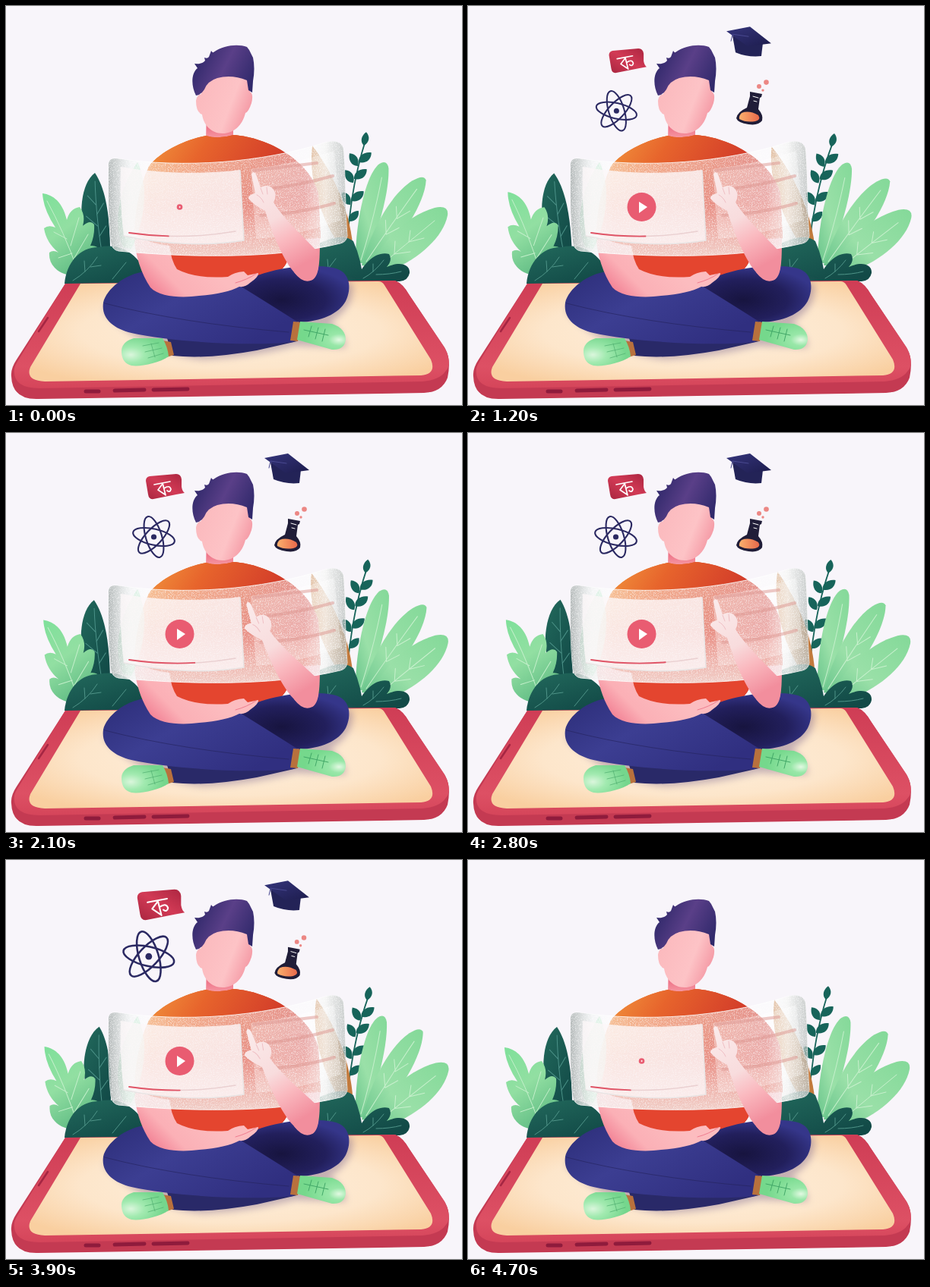
An HTML page that plays this animation: 600x526 px, repeating every 4800 ms.

```html
<!DOCTYPE html>
<html lang="en">
<head>
<meta charset="utf-8">
<title>Learning on a phone</title>
<style>
html, body { margin: 0; width: 100%; height: 100%; overflow: hidden; background: #f8f5fa; }
svg { display: block; width: 100vw; height: 100vh; }
</style>
</head>
<body>
<svg viewBox="0 0 600 526" fill="none" stroke-linecap="round" stroke-linejoin="round">
<defs>
  <linearGradient id="mint" x1="0" y1="0" x2=".5" y2="1"><stop stop-color="#7fe09a"/><stop offset=".5" stop-color="#92dfa2"/><stop offset="1" stop-color="#62bd85"/></linearGradient>
  <linearGradient id="pale" x1="1" y1="0" x2="0" y2="1"><stop stop-color="#84d999"/><stop offset=".6" stop-color="#9ae0a8"/><stop offset="1" stop-color="#68c48b"/></linearGradient>
  <linearGradient id="teal" x1="0" y1="0" x2=".7" y2="1"><stop stop-color="#22695c"/><stop offset="1" stop-color="#124a47"/></linearGradient>
  <linearGradient id="rim" x1="0" y1="0" x2="0" y2="1"><stop stop-color="#cf3d55"/><stop offset=".8" stop-color="#dd5064"/><stop offset="1" stop-color="#d5455a"/></linearGradient>
  <radialGradient id="cream" cx=".5" cy=".5" r=".62"><stop stop-color="#feefdc"/><stop offset=".6" stop-color="#fde6cb"/><stop offset="1" stop-color="#f9cfa0"/></radialGradient>
  <linearGradient id="tee" x1=".05" y1="0" x2=".9" y2=".4"><stop stop-color="#f29a3f"/><stop offset=".35" stop-color="#e7642c"/><stop offset=".75" stop-color="#d43f2a"/><stop offset="1" stop-color="#c9302c"/></linearGradient>
  <linearGradient id="hem" x1="0" y1="0" x2="0" y2="1"><stop offset=".15" stop-color="#e0402f" stop-opacity="0"/><stop offset=".8" stop-color="#e4452f"/></linearGradient>
  <linearGradient id="face" x1="0" y1=".3" x2="1" y2=".7"><stop stop-color="#fbb9bd"/><stop offset=".6" stop-color="#fdc3c6"/><stop offset="1" stop-color="#f3929f"/></linearGradient>
  <linearGradient id="neck" x1="0" y1="0" x2="0" y2="1"><stop offset=".5" stop-color="#ee7388"/><stop offset="1" stop-color="#f9a5ac"/></linearGradient>
  <linearGradient id="hair" x1="0" y1=".3" x2="1" y2=".7"><stop stop-color="#2d2768"/><stop offset=".5" stop-color="#5a3f88"/><stop offset="1" stop-color="#30296b"/></linearGradient>
  <linearGradient id="arm" x1="0" y1=".8" x2=".6" y2=".5"><stop stop-color="#ef7189"/><stop offset=".45" stop-color="#fbb0b6"/><stop offset="1" stop-color="#fcbcbf"/></linearGradient>
  <linearGradient id="forearm" x1="0" y1="0" x2=".35" y2="1"><stop stop-color="#fbecec"/><stop offset=".5" stop-color="#f8dcdd"/><stop offset=".72" stop-color="#fab9bf"/><stop offset="1" stop-color="#f28e9d"/></linearGradient>
  <linearGradient id="thigh" x1="0" y1="0" x2="1" y2=".6"><stop stop-color="#2c2d78"/><stop offset=".45" stop-color="#3c3e92"/><stop offset="1" stop-color="#302f80"/></linearGradient>
  <radialGradient id="far" cx=".45" cy=".6" r=".6"><stop stop-color="#17143f"/><stop offset=".6" stop-color="#221f5c"/><stop offset="1" stop-color="#35368a"/></radialGradient>
  <radialGradient id="shoe1" cx=".2" cy=".6" r=".7"><stop stop-color="#daf6dc"/><stop offset=".4" stop-color="#a2eab0"/><stop offset="1" stop-color="#75d68d"/></radialGradient>
  <radialGradient id="shoe2" cx=".86" cy=".65" r=".7"><stop stop-color="#e2f9e2"/><stop offset=".3" stop-color="#98e7a8"/><stop offset="1" stop-color="#75d88c"/></radialGradient>
  <linearGradient id="edge"><stop stop-color="#87918f" stop-opacity=".6"/><stop offset=".09" stop-color="#e8eeec" stop-opacity=".4"/><stop offset=".18" stop-color="#fff" stop-opacity="0"/><stop offset=".82" stop-color="#fff" stop-opacity="0"/><stop offset=".91" stop-color="#f2f3f1" stop-opacity=".6"/><stop offset="1" stop-color="#949d9a" stop-opacity=".5"/></linearGradient>
  <linearGradient id="haze" x1="0" y1="0" x2="0" y2="1"><stop stop-color="#fff" stop-opacity=".48"/><stop offset=".55" stop-color="#fff" stop-opacity=".42"/><stop offset="1" stop-color="#f4f5f3" stop-opacity=".78"/></linearGradient>
  <linearGradient id="red" x1="1" y1="0" x2="0" y2="1"><stop stop-color="#a9243f"/><stop offset=".5" stop-color="#d23a55"/><stop offset="1" stop-color="#a8253f"/></linearGradient>
  <linearGradient id="navy" x1="0" y1="0" x2="1" y2="1"><stop stop-color="#35357c"/><stop offset="1" stop-color="#1d1c4d"/></linearGradient>
  <linearGradient id="liquid"><stop stop-color="#fbb06d"/><stop offset="1" stop-color="#e9694b"/></linearGradient>
  <filter id="soft" x="-20%" y="-40%" width="140%" height="180%"><feGaussianBlur stdDeviation="5"/></filter>
  <filter id="grain" x="0" y="0" width="100%" height="100%"><feTurbulence type="fractalNoise" baseFrequency=".75" numOctaves="2" seed="4"/><feColorMatrix values="0 0 0 0 1  0 0 0 0 1  0 0 0 0 1  5 0 0 0 -2.5"/></filter>
  <path id="glass" d="M135 208Q136 200 145 201C235 214 335 207 420 180Q440 175 444 188C447 225 446 268 449 303Q448 311 440 313C350 335 230 331 148 323Q139 321 138 311C134 275 135 240 135 208Z"/>
  <clipPath id="inGlass"><use href="#glass"/></clipPath>
</defs>

<rect width="600" height="526" fill="#f8f5fa"/>

<!-- plants -->
<g id="twig"></g>
<g id="leafA"><path fill="url(#pale)" d="M460 338C459 290 472 222 491 208Q501 202 503 214C504 245 490 295 473 340Z"/><path stroke="#c5efcb" d="M467 335Q484 280 494 226"/></g>
<g id="leafB"><path fill="url(#pale)" d="M468 342C480 295 506 248 534 230Q549 221 552 229C551 258 522 305 484 344Z"/><path stroke="#c8f0cd" d="M474 337Q505 290 540 241M500 301L499 282M500 301L517 292M514 280L513 264M514 280L531 270"/></g>
<g id="leafC"><path fill="url(#pale)" d="M476 352C496 305 530 276 564 266Q583 262 581 276C575 308 535 340 494 353Z"/><path stroke="#c8f0cd" d="M488 346Q525 315 564 283M511 327L512 310M511 327L532 324M530 311L532 296M530 311L550 306"/></g>
<g id="brown"><path fill="#c27a3d" d="M446 325C414 285 398 225 404 184C421 206 454 260 457 325Z"/></g>
<g id="dark"><path fill="url(#teal)" d="M118 220C103 231 99 258 100 277Q104 315 117 338L137 338C138 290 135 246 118 220Z"/><path stroke="#4b9187" d="M118 231Q119 280 127 330M119 262L108 250M120 275L129 260M121 290L106 277M123 304L132 290"/></g>
<g id="fern"><path fill="url(#mint)" d="M48 247C64 249 75 261 80 282Q84 267 97 265Q105 276 101 290Q111 281 116 288Q117 303 111 316Q120 315 123 322Q114 350 97 356Q74 356 64 345Q56 337 57 325Q62 321 69 325Q53 312 50 293Q56 288 65 292Q49 268 48 247Z"/><path stroke="#c3efca" d="M54 257Q75 295 95 350M80 307L63 298M87 326L69 332M85 316L96 279M90 332L108 301"/></g>
<path fill="url(#teal)" d="M77 366C80 337 98 317 123 318C152 311 180 330 190 366Z"/>
<path stroke="#4f9488" d="M88 362Q108 350 120 331M104 350L103 336M111 344L125 342M140 360L158 338"/>
<path fill="url(#teal)" d="M402 364L412 313Q442 298 457 310Q468 335 470 363ZM460 363C470 338 487 323 504 327Q509 335 501 344C519 336 532 341 531 352Q529 362 518 363Z"/>
<path stroke="#4f9488" d="M470 359Q485 351 497 335M483 350L483 340M487 354Q505 354 520 350M416 357L434 333M424 346L423 334"/>

<!-- phone -->
<path fill="#c43a52" d="M78 366L512 362Q522 366 530 380L578 452Q586 466 581 490Q574 509 550 510L42 518Q8 519 7 488Q6 478 14 466Z"/>
<path fill="url(#rim)" d="M78 366L512 362Q522 366 530 380L577 450Q588 472 578 482Q570 493 548 495L44 504Q8 504 11 478Q12 473 18 464Z"/>
<path fill="url(#cream)" d="M98 366L490 363Q495 363 498 368L559 466Q567 485 546 487L51 495Q25 494 32 476Z"/>
<path stroke="#8f1b3c" stroke-width="5" d="M105 508H122M143 507L182 506M194 506L239 505"/>
<path stroke="#a52643" stroke-width="2.5" d="M43 429L55 411"/>
<path fill="#77608a" opacity=".42" filter="url(#soft)" d="M128 402C160 435 210 462 260 466Q330 462 380 448L448 450Q440 422 425 418Q462 395 455 365L180 370Z"/>

<!-- person -->
<path fill="url(#neck)" d="M264 140H299V175Q282 184 263 175Z"/>
<g id="shirt">
  <path id="cloth" fill="url(#tee)" d="M263 171C236 176 205 191 189 210C176 235 170 270 168 306L216 320L220 348Q224 358 258 359L344 357Q370 350 373 325L414 306L411 247C400 205 346 173 299 170Q280 176 263 171Z"/>
  <use href="#cloth" style="fill:url(#hem)"/>
</g>
<path fill="url(#hem)" d="M189 210C176 235 170 270 168 306L216 320L220 348Q224 358 258 359L344 357Q370 350 373 325L414 306L411 247Z"/>
<path fill="url(#face)" d="M258 98Q290 85 319 98L321 113Q326 116 323 128Q319 140 315 141C311 158 299 168 285 168C270 168 260 157 258 143Q250 140 250 125Q251 117 257 116Z"/>
<path fill="url(#hair)" d="M250 118C243 104 244 88 252 82L248 76Q258 77 262 72L261 68Q265 70 267 67L270 59Q272 62 273 61C287 51 306 50 317 54L320 58L325 68Q328 82 325 99L324 114L319 111L317 98Q297 90 278 95Q265 99 261 110Q257 117 250 118Z"/>
<path fill="url(#far)" d="M290 376C335 344 398 339 430 345C454 349 455 373 447 389C438 406 414 416 386 417L330 402Z"/>
<path fill="#292968" d="M212 438L219 461Q265 466 330 454L383 442L330 425Z"/>
<path fill="url(#thigh)" d="M183 350C157 353 132 373 128 391C125 412 141 425 165 431C220 443 320 449 378 443L386 418Q350 395 308 369L215 368Z"/>
<path stroke="#25245f" d="M130 392Q230 418 372 430" opacity=".65"/>
<path fill="#b8713d" d="M206 441L217 443L221 460L211 463ZM378 416L389 417L384 442L374 441Z"/>
<path fill="url(#shoe1)" d="M152 457Q151 443 168 438L206 438Q213 450 214 462C201 471 176 476 165 474Q153 471 152 457Z"/>
<path stroke="#4fae70" opacity=".7" d="M180 448L201 444M183 456L205 451M187 464L207 458M191 445L196 463"/>
<path fill="url(#shoe2)" d="M387 416L429 419Q447 425 447 440Q445 454 429 453L383 440Z"/>
<path stroke="#42a868" d="M392 427L424 434M402 422L398 436M411 424L407 439M420 426L416 442"/>
<path fill="url(#arm)" d="M168 300C170 330 178 353 190 371C202 384 232 385 254 382Q290 379 307 370Q315 371 321 365Q333 357 332 352L318 355L313 350Q300 351 292 357Q250 360 225 347Q217 335 215 316Q190 314 168 300Z"/>
<path stroke="#ef7d90" d="M302 365Q317 361 329 353"/>
<path fill="#f5919f" d="M376 308L413 306C413 338 412 356 403 361Q391 367 379 351Z"/>

<!-- floating glass screen -->
<path fill="#9fe0b6" opacity=".65" d="M154 318C138 282 153 232 173 206C190 242 180 290 165 320Z"/>
<use href="#glass" fill="url(#haze)" stroke="#fff" stroke-opacity=".8"/>
<use href="#glass" fill="url(#edge)"/>
<rect x="132" y="175" width="320" height="156" filter="url(#grain)" clip-path="url(#inGlass)" opacity=".5"/>
<path fill="#fdf8f9" opacity=".8" d="M151 212C200 221 260 222 308 216L313 309C260 318 200 313 155 303Q149 258 151 212Z"/>
<path stroke="#e9e5e5" stroke-width="1.5" d="M308 217L313 309C260 318 200 313 155 303"/>
<path fill="#fff" opacity=".3" d="M322 215Q380 208 432 191L441 282Q385 303 329 307Z"/>
<path stroke="#de958f" stroke-width="4" opacity=".5" d="M326 217L409 207M331 243Q385 237 430 224M335 276Q390 273 432 260"/>
<path stroke="#ead0d1" stroke-width="1.5" d="M162 299Q232 309 302 297"/>
<path id="progress" stroke="#e05567" stroke-width="1.8" d="M162 299Q232 309 302 297"/>
<g id="play"><circle cx="228.5" cy="265" r="19" fill="#e95c71"/><path fill="#fff" d="M225 258L236 265L225 273Z"/></g>
<g id="hand"><path fill="url(#forearm)" d="M323 222Q325 216 329 222L335 239Q346 234 352 242Q357 249 352 259C365 280 390 303 410 324Q415 350 403 361Q390 366 375 346C360 325 348 292 341 270Q328 264 319 254Q318 249 328 247Z"/><path stroke="#efbfc4" d="M335 240L338 248M343 239L344 248M330 249Q336 252 339 259"/></g>

<!-- icons -->
<g id="bubble"><path fill="url(#red)" d="M189 57L224 54Q230 54 231 61L231 71Q232 77 235 79L224 81L194 87Q188 88 187 81L184 63Q184 58 189 57Z"/><path stroke="#fff" stroke-width="1.7" d="M195 68L216 64M206 66L210 82M206 67L200 75L209 81M208 73Q215 68 217 74Q216 79 212 76"/></g>
<g id="atom" stroke="#2b2962" stroke-width="2.100"><g id="orbits"></g><circle cx="194.500" cy="137" r="3.600" fill="#2b2962" stroke="none"/></g>
<g id="flask"><path fill="#201d38" d="M371 113L387 116L386 120L384 121L382 136Q389 144 387 151Q382 158 369 156Q355 154 353 148Q354 140 367 134L371 119Z"/><path fill="url(#liquid)" d="M360 141Q370 137 382 144Q386 150 378 152Q366 154 357 149Q356 145 360 141Z"/><path stroke="#fff" d="M375 119L382 121M376 125L380 126"/><g fill="#ec8784"><circle cx="383" cy="106" r="3"/><circle cx="392.5" cy="100.5" r="3.3"/><circle cx="388" cy="111" r="1.7"/></g></g>
<g id="cap"><path fill="#232357" d="M348 39L352 61Q369 68 386 66L388 49Z"/><path fill="url(#navy)" d="M340 33L371 27L399 49L368 53Z"/><path stroke="#4a4a91" d="M369 40L348 37L346 46"/></g>
</svg>
<script>
const LOOP = 4800, STEP = 100, TURN = 2 * Math.PI;
const el = id => document.getElementById(id);
const clamp = v => Math.max(0, Math.min(1, v));
const mix = (a, b, k) => a + (b - a) * k;
const ease = k => (1 - Math.cos(Math.PI * clamp(k))) / 2;

// Interpolates a list of [time, value] pairs.
function track(keys, t, curve = clamp) {
  const i = Math.max(1, keys.findIndex(key => key[0] >= t));
  const [[t0, a], [t1, b]] = [keys[i - 1], keys[i]];
  return mix(a, b, curve((t - t0) / (t1 - t0)));
}

function spin(id, angle, x, y) {
  el(id).setAttribute('transform', `rotate(${angle} ${x} ${y})`);
}

function grow(id, scale, x, y) {
  el(id).setAttribute('transform', `translate(${x} ${y}) scale(${scale}) translate(${-x} ${-y})`);
}

// Springs up past full size, dips slightly, then rests.
function pop(t, start, peak = 1.23) {
  const u = t - start;
  if (u <= 0) return 0;
  if (u < 350) return peak * Math.sin(u / 350 * Math.PI / 2);
  if (u < 730) return mix(peak, .97, ease((u - 350) / 380));
  return mix(.97, 1, ease((u - 730) / 400));
}

el('orbits').innerHTML = [73, 13, -47].map(a =>
  `<ellipse cx="194.5" cy="137" rx="28" ry="10.5" transform="rotate(${a} 194.5 137)"/>`).join('');

const twigLeaf = (x, y, angle, size) =>
  `<path fill="#17645a" transform="translate(${x} ${y}) rotate(${angle}) scale(${size})" d="M0 0C4 -8 14 -8 21 -2C16 6 7 7 0 0Z"/>`;
let twig = '<path stroke="#17645a" stroke-width="1.8" d="M449 314Q453 240 474 174"/>' + twigLeaf(471, 184, -75, .85);
[[464, 206], [458, 228], [454, 257]].forEach(([x, y]) => {
  twig += twigLeaf(x, y, -32, 1) + twigLeaf(x - 1, y + 5, -118, .95);
});
twig += twigLeaf(451, 284, -42, .9);
el('twig').innerHTML = twig;

const drift = [[0, 0], [900, 1], [2350, .2], [3450, .75], [4700, 0], [4800, 0]];
const watched = [[0, 214], [2800, 260], [3900, 229], [4700, 214], [4800, 214]];

function draw(t) {
  const there = Math.max(0, Math.min(t, 4700 - t));
  const sway = Math.cos(TURN * (there - 740) / 1030);
  const bend = track(drift, t, ease);
  const tap = clamp(.5 + 1.1 * Math.cos(TURN * (t / 1600 - .38)));

  spin('dark', 2.5 * sway, 126, 335);
  spin('brown', 2 * sway, 445, 320);
  spin('leafA', -1 * sway, 469, 338);
  spin('leafB', -1.8 * sway, 474, 340);
  spin('leafC', 2 * bend, 482, 348);
  spin('fern', 2.6 * bend, 95, 350);
  spin('twig', 3.4 * bend, 449, 314);
  spin('hand', -3.2 * tap, 390, 345);

  grow('play', mix(.2, 1, ease(there / 450)), 228.5, 265);
  grow('cap', pop(there, 150), 365, 105);
  grow('flask', pop(there, 120, 1.18), 370, 195);
  grow('atom', pop(there, 400), 225, 182);
  grow('bubble', pop(there, 470), 234, 122);

  el('progress').setAttribute('stroke-dasharray', `${track(watched, t) - 162} 300`);
}

let begin;
function frame(now) {
  begin ??= now;
  draw(Math.floor((now - begin) % LOOP / STEP) * STEP);
  requestAnimationFrame(frame);
}
draw(0);
requestAnimationFrame(frame);
</script>
</body>
</html>
```
